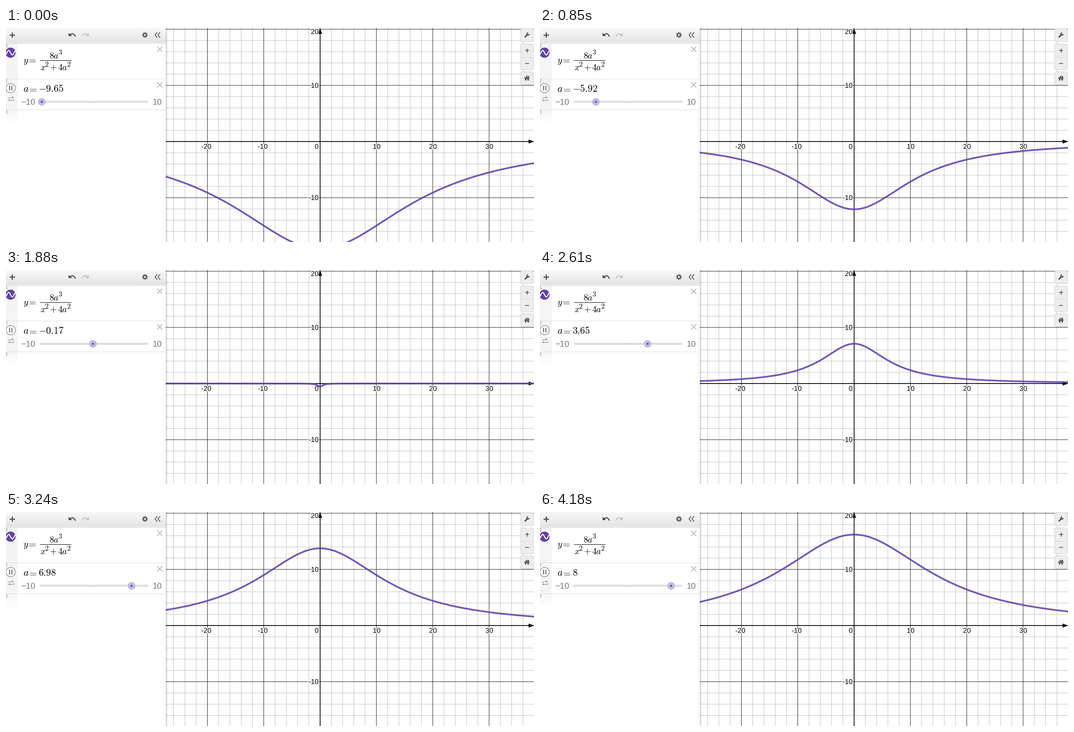
A matplotlib script for the animation above (4210 ms loop, 1173 px wide and 477 px high).

```python
import numpy as np
import matplotlib.pyplot as plt
from matplotlib.animation import FuncAnimation
from matplotlib.patches import Circle, FancyBboxPatch, PathPatch, Polygon, Rectangle
from matplotlib.path import Path
from matplotlib.patheffects import withStroke

W, H, DPI = 1173, 477, 72  # at 72 dpi one point is one pixel
LOOP, FRAMES = 4210, 128
X0, Y0, UNIT = 697.75, 253.1, 12.515  # graph origin and pixels per unit
PURPLE, DARK, PALE = "#6042a6", "#4a4a4a", "#bdbdbd"
CURVE_LAG = 0.6  # the curve trails the readout by part of a frame

# the parameter bounces between -10 and 10 at a near constant rate
KNOTS = [-1, 0, 2, 13, 38, 57, 79, 98, 115.45, 127]
VALUES = [-9.475, -9.65, -10, -8.08, -3.59, -0.17, 3.65, 6.98, 10, 8]

plt.rcParams["mathtext.fontset"] = "cm"
plt.rcParams["font.family"] = "Liberation Sans"

fig = plt.figure(figsize=(W / DPI, H / DPI), dpi=DPI, facecolor="white")
ax = fig.add_axes([0, 0, 1, 1])
ax.set_xlim(0, W)
ax.set_ylim(H, 0)
ax.axis("off")


def line(xs, ys, color, width=1.0, z=8, cap="butt", **kw):
    return ax.plot(xs, ys, color=color, lw=width, zorder=z,
                   solid_capstyle=cap, **kw)[0]


def rect(x, y, w, h, color, z=6):
    ax.add_patch(Rectangle((x, y), w, h, fc=color, ec="none", zorder=z))


def poly(points, color, z=9):
    ax.add_patch(Polygon(points, closed=True, fc=color, ec="none", zorder=z))


def disc(x, y, r, color, z=9, edge="none", width=0.0):
    patch = Circle((x, y), r, fc=color, ec=edge, lw=width, zorder=z)
    return ax.add_patch(patch)


def curve(points, codes, color, width, z=9):
    ax.add_patch(PathPatch(Path(points, codes), fc="none", ec=color, lw=width,
                           capstyle="round", zorder=z))


def label(x, y, s, size, color="black", z=9, ha="center", **kw):
    return ax.text(x, y, s, fontsize=size, color=color, zorder=z, ha=ha,
                   va="baseline", **kw)


def tex(x, y, s, size):
    return label(x, y, f"${s}$", size, ha="left")


def shade(x0, x1, y0, y1, top, bottom, z):
    """Vertical grey gradient between two levels."""
    ramp = np.linspace(top, bottom, 64)[:, None]
    ax.imshow(ramp, extent=(x0, x1, y1, y0), cmap="gray", vmin=0, vmax=1,
              aspect="auto", zorder=z, interpolation="bilinear")


def grid_line(k, xs, ys):
    major = k % 10 == 0
    line(xs, ys, "#1c1c1c" if major else "#c0c0c0", 1, 2 if major else 1, snap=False)


def draw_grid():
    for k in range(-26, 38, 2):
        x = X0 + k * UNIT
        grid_line(k, [x, x], [0, H])
    for k in range(-16, 21, 2):
        y = Y0 - k * UNIT
        grid_line(k, [355, W], [y, y])
    line([X0, X0], [4, H], "black", 1.6, 2, snap=False)
    line([355, W - 4], [Y0, Y0], "black", 1.6, 2, snap=False)
    poly([(X0, 0.5), (X0 - 4.5, 13), (X0 + 4.5, 13)], "black", 3)
    poly([(W, Y0), (W - 12, Y0 - 4.5), (W - 12, Y0 + 4.5)], "black", 3)

    outline = [withStroke(linewidth=3, foreground="white")]
    for k in (-20, -10, 10, 20, 30):
        shift = -2.5 if k < 0 else 0.5
        label(X0 + k * UNIT + shift, 269.3, str(k), 15.5, z=3, path_effects=outline)
    label(690.3, 269.3, "0", 15.5, z=3, path_effects=outline)
    for k, y in ((20, 13.3), (10, 133.3), (-10, 383.3)):
        label(694.5, y, str(k), 15.5, z=3, ha="right", path_effects=outline)


def draw_header():
    shade(0, 355, 0, 33, 0.97, 0.89, 7)
    line([0, 355], [33.5, 33.5], "#cfcfcf")
    line([7.5, 20], [15.5, 15.5], DARK, 2.4)
    line([13.8, 13.8], [9.5, 21.5], DARK, 2.4)

    # undo, and redo as its mirror image
    for mirror, color in ((False, DARK), (True, "#c4c4c4")):
        def flip(points):
            return [(323 - x, y) if mirror else (x, y) for x, y in points]
        poly(flip([(139.3, 10.8), (139.3, 17.8), (147, 17.8)]), color)
        curve(flip([(142.5, 15), (149.5, 9), (154, 18.5)]),
              [Path.MOVETO, Path.CURVE3, Path.CURVE3], color, 2.3)

    t = np.linspace(0, 2 * np.pi, 193)
    r = 5.4 + 1.1 * np.tanh(4 * np.cos(8 * t))
    poly(np.column_stack([308.7 + r * np.cos(t), 15.5 + r * np.sin(t)]), DARK)
    disc(308.7, 15.5, 2.3, "#eeeeee", 10)
    for x in (331, 337.5):
        line([x + 5, x, x + 5], [9.5, 15.5, 21.5], DARK, 1.6)


def draw_rows():
    rect(0, 0, 355, H, "white", 6)
    for i in range(4):
        rect(355 + i, 0, 1, H, (0, 0, 0, 0.2 - 0.05 * i), 6)
    rect(0, 34, 25.5, 147, "#f4f4f4", 7)
    shade(0, 25.5, 181, 215, 0.957, 1.0, 7)
    for y in (112.5, 181.5):
        line([0, 355], [y, y], "#dcdcdc")
    for i, y in enumerate((43, 122, 191)):
        label(-2, y, str(i + 1), 9.5, "#8a8a8a", ha="left")
    for y in (47.5, 126.5):
        for s in (-1, 1):
            line([335.7, 347.3], [y - 5.8 * s, y + 5.8 * s], PALE, 2)

    # curve badge
    disc(10, 55, 11.3, PURPLE)
    x = np.linspace(-1, 20, 50)
    line(x, 55 - 5 * np.sin(np.pi * (x - 2) / 8), "white", 2.2, 10, "round")

    # pause button and loop mode
    disc(10.3, 134, 10.4, "#f8f8f8", edge="#777777", width=1.1)
    for x in (6.6, 11.6):
        rect(x, 129.3, 2.4, 9.4, "#666666", 10)
    line([5.5, 5.5, 14], [157.2, 154.5, 154.5], "#888888", 1.1)
    line([16.5, 16.5, 8], [158.2, 161, 161], "#888888", 1.1)
    poly([(13.5, 152), (17, 154.5), (13.5, 157)], "#888888")
    poly([(8.5, 158.5), (5, 161), (8.5, 163.5)], "#888888")

    # formula
    tex(37.5, 77.5, "y", 20.5)
    tex(46.8, 77.5, "=", 20.5)
    line([75, 144.5], [71.5, 71.5], "black", 1)
    tex(96, 68, "8a", 19.6)
    tex(116.3, 58.8, "3", 15.5)
    tex(76.2, 94, "x", 19.6)
    tex(85.8, 86, "2", 15.5)
    tex(96.6, 94, "+", 19.6)
    tex(114.8, 94, "4a", 19.6)
    tex(134.6, 86, "2", 15.5)
    tex(38.3, 142, "a", 21.6)
    tex(48.5, 142, "=", 21.6)

    # slider
    label(33, 170.8, "\u221210", 18.8, "#777777", ha="left")
    label(325.8, 170.8, "10", 18.8, "#777777", ha="left")
    rect(75, 162, 240.5, 5, "#e0e0e2", 8)
    rect(195, 163.5, 1.4, 1.8, "#888888", 9)


def button(y, h):
    ax.add_patch(FancyBboxPatch((1147.5, y + 4), 20, h - 8, fc="#ededed", ec="#cfcfcf",
                                lw=1, zorder=7,
                                boxstyle="round,pad=4,rounding_size=4"))


def draw_buttons():
    for y, h in ((1.5, 29), (35.5, 58), (97.5, 29)):
        button(y, h)
    line([1143.5, 1171.5], [64.5, 64.5], "#d6d6d6")
    for y in (50, 78.8):
        line([1153, 1162], [y, y], DARK, 1.5)
    line([1157.5, 1157.5], [45.5, 54.5], DARK, 1.5)

    # wrench
    line([1153.2, 1158.5], [20, 14.7], DARK, 3, 9, "round")
    t = np.radians(np.linspace(0, 270, 30))
    line(1159.7 + 2.6 * np.cos(t), 13.3 + 2.6 * np.sin(t), DARK, 2.2)

    # home
    line([1151.2, 1157.3, 1163.4], [112.6, 107.2, 112.6], DARK, 1.6)
    poly([(1153, 112.8), (1157.3, 109.2), (1161.6, 112.8), (1161.6, 117),
          (1158.5, 117), (1158.5, 113.5), (1156, 113.5), (1156, 117), (1153, 117)], DARK)
    rect(1160, 107, 1.8, 3, DARK, 9)


draw_grid()
draw_rows()
draw_header()
draw_buttons()
ax.set_xlim(0, W)
ax.set_ylim(H, 0)

xs = np.linspace(350, W + 5, 700)
units = (xs - X0) / UNIT
graph = line(xs, np.full_like(xs, Y0), PURPLE, 3.8, 5, alpha=0.88)
readout = tex(71.6, 142, "0", 21.6)
halo = disc(75, 164.6, 7.8, "#bfbbe1", 10, "#b0abd8", 0.8)
dot = disc(75, 164.6, 2.2, PURPLE, 11)


def parameter(frame):
    return float(np.interp(frame, KNOTS, VALUES))


def update(frame):
    a = round(parameter(frame), 2)
    readout.set_text(f"${a:g}$")
    for part in (halo, dot):
        part.set_center((75.2 + (a + 10) * 12, 164.6))
    b = parameter(frame - CURVE_LAG)
    graph.set_ydata(Y0 - UNIT * 8 * b**3 / (units**2 + 4 * b**2 + 1e-9))
    return graph, readout, halo, dot


anim = FuncAnimation(fig, update, frames=FRAMES, interval=LOOP / FRAMES,
                     repeat=True, repeat_delay=0, blit=False)
plt.show()
```
